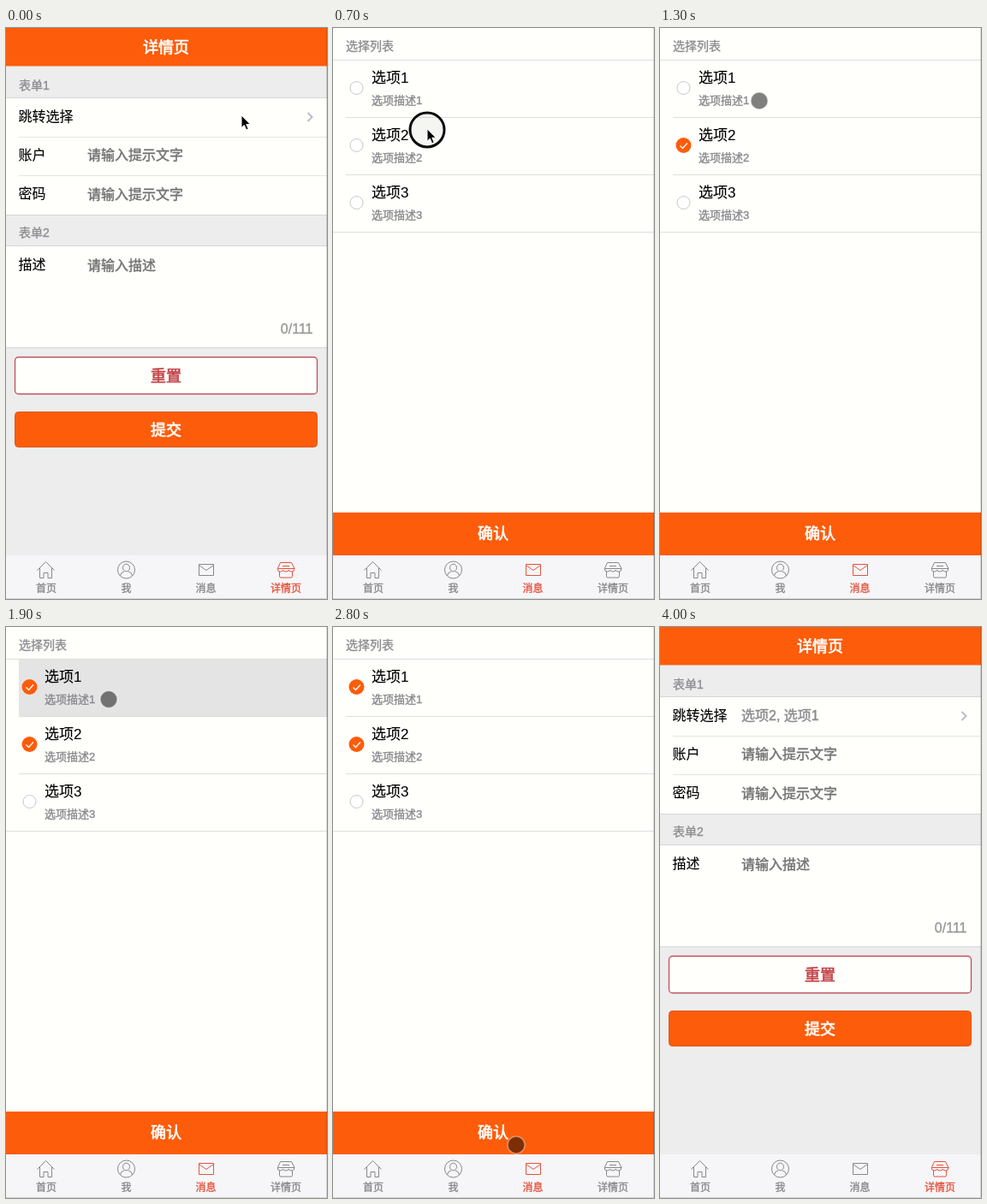
Write an HTML page that moves like this. It is 375 px wide and 667 px high and loops after 4.1 s.

```html
<!DOCTYPE html>
<html lang="zh-CN">
<head>
<meta charset="utf-8">
<style>
  html, body { margin: 0; width: 100%; height: 100%; overflow: hidden; background: #fffffc; }
  svg { display: block; font-family: "Liberation Sans", "Noto Sans CJK SC", "Noto Sans CJK", sans-serif; }
  .tab { fill: none; stroke: currentColor; color: #88888c; }
  .tab.on { color: #e5533c; }
</style>
</head>
<body>
<svg id="stage" width="375" height="667" viewBox="0 0 375 667"></svg>
<script>
const ORANGE = '#fd5c0a', WHITE = '#fffffc', GRAY = '#8c8c90', HINT = '#727272';
const STEP = 100, STEPS = 41;
const stage = document.getElementById('stage');

const rect = (x, y, w, h, fill, extra = '') =>
  `<rect x="${x}" y="${y}" width="${w}" height="${h}" fill="${fill}" ${extra}/>`;
const line = (y, x = 0, color = '#d6d6d6') => rect(x, y, 375 - x, 1, color);
// y is the vertical middle of the glyphs; a thin outline of the given width makes a medium weight
const text = (s, x, y, size, fill, outline = 0, anchor = 'start') =>
  `<text x="${x}" y="${y + size * .37}" font-size="${size}" fill="${fill}" stroke="${fill}" stroke-width="${outline}" text-anchor="${anchor}">${s}</text>`;
const label = (s, y) => text(s, 14.5, y, 16, '#000', .1);
const hint = (s, y, fill = HINT) => text(s, 95, y, 16, fill, .45);
const section = (s, y) => text(s, 15, y, 14, GRAY, .35);
const centered = (s, y, fill) => text(s, 187, y, 18, fill, .7, 'middle');

const tabs = [
  ['首页', 47, 'M36.5 633.5L46.5 623.5L56.5 633.5M39.5 631V642.5H44V636.5H49V642.5H53.5V631'],
  ['我', 140.5, 'M130.5 633a10 10 0 1 0 20 0a10 10 0 1 0-20 0M136.5 630.5a4 4.3 0 1 0 8 0a4 4.3 0 1 0-8 0M133.5 640Q134 635.5 138 635M147.5 640Q147 635.5 143 635'],
  ['消息', 233.5, 'M225.5 626.5H242.5V639.5H225.5ZM225.5 627.5L234 633.5L242.5 627.5'],
  ['详情页', 327, 'M320.5 624.5H333.5L337 631.5q0 3.5-3.4 3.5t-3.4-2q0 2-3.3 2t-3.3-2q0 2-3.3 2t-3-3.5ZM317.5 631.5H337M319.5 635V640.5q0 1.5 1.5 1.5H333q1.5 0 1.5-1.5V635M323 628.5H331'],
];

const tabBar = active => rect(0, 616, 375, 51, '#f6f6f9') + tabs.map(([name, x, icon], i) =>
  `<g class="tab ${i === active ? 'on' : ''}"><path d="${icon}"/>${text(name, x, 654.7, 12, 'currentColor', .35, 'middle')}</g>`
).join('');

function form(pressed, chosen) {
  return rect(0, 0, 375, 616, '#ededed') + rect(0, 0, 375, 44.5, ORANGE) + centered('详情页', 22.5, '#fff') +
    section('表单1', 67) + rect(0, 82, 375, 136, WHITE) +
    (pressed ? rect(0, 82, 375, 45, '#e5e5e5') : '') +
    line(81) + line(127, 15, '#e4e4e2') + line(172, 15, '#e4e4e2') + line(218) +
    label('跳转选择', 103) + hint(chosen, 103, GRAY) +
    '<path d="M352.5 99L357.5 104L352.5 109" fill="none" stroke="#bdbdc2" stroke-width="2"/>' +
    label('账户', 148) + hint('请输入提示文字', 148.5) +
    label('密码', 193) + hint('请输入提示文字', 194) +
    section('表单2', 239) + rect(0, 255, 375, 118, WHITE) + line(254) + line(373) +
    label('描述', 276) + hint('请输入描述', 277) +
    text('0/111', 358.5, 351, 16, '#9b9b9b', .45, 'end') +
    rect(10.5, 384.5, 353, 43, WHITE, 'rx="4" stroke="#bb525b" stroke-width="1.3"') + centered('重置', 406, '#c4444a') +
    rect(10.5, 448.5, 353, 41, ORANGE, 'rx="4" stroke="#de5818"') + centered('提交', 469, '#fff') +
    tabBar(3);
}

function option(i, checked, pressed) {
  const y = 38 + 67 * i;
  const radio = checked
    ? `<circle cx="27.5" cy="${y + 32}" r="9" fill="${ORANGE}"/><path d="M23.5 ${y + 32.5}l3 3l5.5-6" fill="none" stroke="#fff" stroke-width="1.3"/>`
    : `<circle cx="27.5" cy="${y + 32}" r="7.5" fill="#fff" stroke="#c8c8c8"/>`;
  return (pressed ? rect(15, y, 360, 66, '#e4e4e4') : '') + radio +
    text('选项' + (i + 1), 45, y + 20, 17, '#000', .1) +
    text('选项描述' + (i + 1), 45, y + 46, 13, GRAY, .4) +
    line(y + 66, i < 2 ? 15 : 0, '#dededc');
}

function list(n) {
  return rect(0, 0, 375, 616, WHITE) + section('选择列表', 21) + line(37, 0, '#dededc') +
    option(0, n >= 19, n === 18 || n === 19) +
    option(1, n >= 11, n === 10 || n === 11) +
    option(2) +
    tabBar(2) + rect(0, 566, 375, 50, ORANGE) + centered('确认', 590.3, '#fff');
}

// step, x, y
const path = [
  [0, 275, 102], [5, 110, 117], [8, 110, 118], [11, 111, 122], [13, 116, 85], [18, 120, 84.5],
  [22, 120, 84.5], [27, 214, 605], [29, 214, 605], [33, 213, 596], [37, 213, 596], [39, 213, 690], [41, 213, 690],
];

function pointer(n) {
  const k = path.findIndex(p => p[0] > n);
  const [n0, x0, y0] = path[k - 1], [n1, x1, y1] = path[k];
  const u = (n - n0) / (n1 - n0), e = u * u * (3 - 2 * u);
  const x = x0 + (x1 - x0) * e, y = y0 + (y1 - y0) * e;
  const clicking = [6, 7, 9, 10, 17, 18, 34, 35].includes(n);
  const ring = clicking
    ? '<circle cy="1.2" r="20" fill="#000" fill-opacity=".04" stroke="#0a0a0a" stroke-width="3"/>' : '';
  const mark = n < 8
    ? '<path d="M0 0V14.5L3.3 11.5L5.7 17L8.2 16L5.8 10.5H10.3Z" stroke="#fff"/>'
    : '<circle r="10" fill-opacity=".5" stroke="#fff" stroke-opacity=".4" stroke-width="1.5"/>';
  return `<g transform="translate(${x} ${y})">${ring}${mark}</g>`;
}

function render(n) {
  const page = n < 7 ? form(n === 6, '') : n < 37 ? list(n) : form(false, '选项2, 选项1');
  stage.innerHTML = page + rect(374, 0, 1, 667, '#000', 'opacity=".15"') + line(666) + pointer(n);
}

let shown = -1;
const start = performance.now();
function tick() {
  const n = Math.floor((performance.now() - start) / STEP) % STEPS;
  if (n !== shown) render(shown = n);
  requestAnimationFrame(tick);
}
tick();
</script>
</body>
</html>
```
